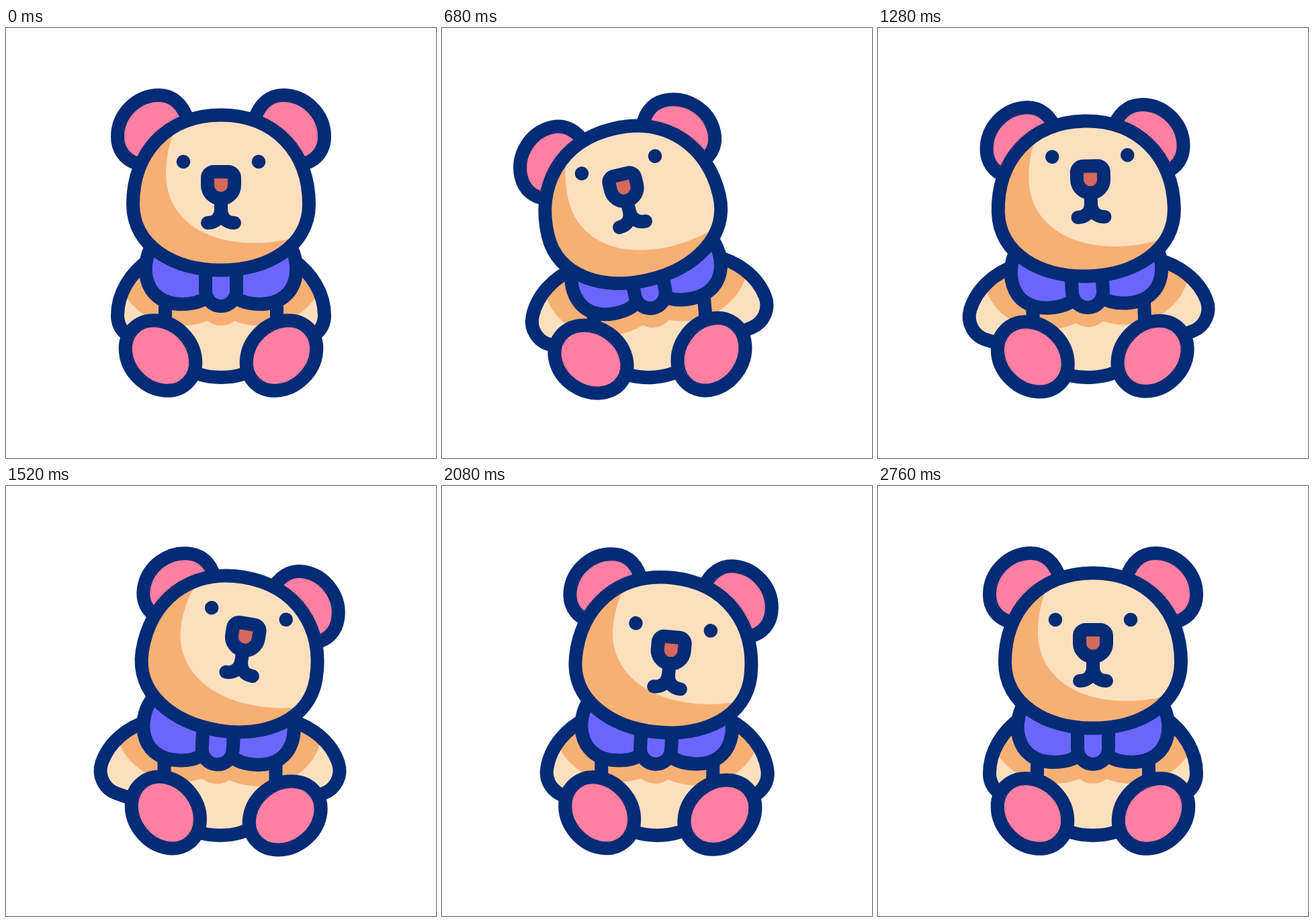
These frames come from a looping animation (640 by 640 pixels, 3 s). An HTML page with a canvas:

```html
<!DOCTYPE html>
<html lang="en">
<head>
<meta charset="utf-8">
<title>Teddy bear</title>
<style>
  html, body { margin: 0; width: 100%; height: 100%; overflow: hidden; background: #fff; }
  canvas { display: block; width: 640px; height: 640px; }
</style>
</head>
<body>
<canvas id="stage" width="640" height="640"></canvas>
<script>
const ctx = document.getElementById('stage').getContext('2d');
const NAVY = '#042b76', PINK = '#ff7fa2', CREAM = '#fce0be',
      ORANGE = '#f7b074', PURPLE = '#6b66fa', BROWN = '#d5695c';

const shape = {
  head: 'M320 129.5C402 129.5 451 187 451 262C451 325 390 360.5 320 360.5S189 325 189 262C189 187 238 129.5 320 129.5Z',
  light: 'M290 80C250 140 238 180 238 218C238 275 285 320 370 320C395 320 420 316 470 302V80Z',
  ear: 'M270 136C263 113 247 100 228 100C194 100 166 128 166 162C166 180 176 195 193 201L260 200Z',
  nose: 'M309 214H331A9 9 0 0 1 340 223V234A20 20 0 0 1 300 234V223A9 9 0 0 1 309 214Z',
  mouth: 'M320 254V270C320 282 312 290 300 290M320 270C320 282 328 290 340 290',
  arm: 'M213 345C185 365 166 395 166 428A36 36 0 0 0 202 464H275V380Z',
  body: 'M237 390V440C237 500 280 520 320 520S403 500 403 440V390Z',
  wing: 'M222 318C198 345 200 411 262 411C275 411 290 408 300 400V318Z',
  knot: 'M297 340V391A23 23 0 0 0 343 391V340Z'
};
for (const name in shape) shape[name] = new Path2D(shape[name]);

const pivot = {
  head: [320, 355], body: [320, 430], collar: [320, 375], arm: [203, 355],
  footL: [230, 487.5], footR: [410, 487.5]
};

// Each part of a pose: shift x, shift y, rotation in degrees.
const rest = {
  head: [0, 0, 0], face: [0, 0, 0], light: [0, 0, 0], earL: [0, 0, 0], earR: [0, 0, 0],
  body: [0, 0, 0], arm: [0, 0, 0], collar: [0, 0, 0], footL: [0, 0, 0], footR: [0, 0, 0]
};
const left = {
  head: [-15, 16.2, -15.1], face: [-5.3, -17.5, 0], light: [-8, -0.5, 0],
  earL: [4.8, 7, 0], earR: [-9.8, 7, 0],
  body: [-12.3, 0, -5.6], arm: [0, 0, 19.2], collar: [-15, 4, -12.4],
  footL: [-9.6, 6.3, -11.5], footR: [-10.2, -2.2, -11.5]
};
const right = {
  head: [-0.2, 1, 13.4], face: [21, -17, 0], light: [4, -5, 0],
  earL: [11.5, 7.5, 0], earR: [-4, 7.5, 0],
  body: [0.5, 0, 1], arm: [0, 0, 19.2], collar: [-2.5, 0, 6],
  footL: [11, -2.9, 10], footR: [8, 4, 10]
};
const nod = { ...rest, head: [0, 9.5, 0], face: [0, 18.5, 0], light: [0, -9.5, 0] };

const keys = [[0, rest], [200, rest], [810, left], [840, left], [1745, right], [1780, right],
              [2330, nod], [2770, rest], [3000, rest]];

function poseAt(time) {
  const i = keys.findIndex(key => key[0] > time);
  const [t0, from] = keys[i - 1], [t1, to] = keys[i];
  const x = (time - t0) / (t1 - t0), ease = x * x * (3 - 2 * x);
  const pose = {};
  for (const part in from)
    pose[part] = from[part].map((v, k) => v + (to[part][k] - v) * ease);
  return pose;
}

function place(pose, part) {
  const [dx, dy, angle] = pose[part], [px, py] = pivot[part] || [0, 0];
  ctx.translate(px + dx, py + dy);
  ctx.rotate(angle * Math.PI / 180);
  ctx.translate(-px, -py);
}

function scoped(draw) {
  ctx.save();
  draw();
  ctx.restore();
}

function mirror() {
  ctx.translate(640, 0);
  ctx.scale(-1, 1);
}

function fill(path, color) {
  ctx.fillStyle = color;
  ctx.fill(path);
}

function outlined(path, color) {
  fill(path, color);
  ctx.stroke(path);
}

function ellipse(x, y, rx, ry, tilt = 0) {
  const path = new Path2D();
  path.ellipse(x, y, rx, ry, tilt, 0, Math.PI * 2);
  return path;
}

// Fills a part and drops the collar's shadow on it.
function shaded(path, pose) {
  fill(path, CREAM);
  scoped(() => {
    ctx.clip(path);
    ctx.resetTransform();
    place(pose, 'collar');
    fill(ellipse(262, 360, 95, 83), ORANGE);
    fill(ellipse(378, 360, 95, 83), ORANGE);
    fill(ellipse(320, 410, 33, 33), ORANGE);
  });
  ctx.stroke(path);
}

function drawBody(pose) {
  place(pose, 'body');
  for (const flip of [false, true]) scoped(() => {
    if (flip) mirror();
    place(pose, 'arm');
    shaded(shape.arm, pose);
  });
  shaded(shape.body, pose);
}

function drawCollar(pose) {
  place(pose, 'collar');
  outlined(shape.wing, PURPLE);
  scoped(() => { mirror(); outlined(shape.wing, PURPLE); });
  outlined(shape.knot, PURPLE);
}

function drawFoot(pose, part, tilt) {
  place(pose, part);
  outlined(ellipse(...pivot[part], 57, 47, tilt), PINK);
}

function drawHead(pose) {
  place(pose, 'head');
  scoped(() => { place(pose, 'earL'); outlined(shape.ear, PINK); });
  scoped(() => { place(pose, 'earR'); mirror(); outlined(shape.ear, PINK); });
  fill(shape.head, ORANGE);
  scoped(() => {
    ctx.clip(shape.head);
    place(pose, 'light');
    fill(shape.light, CREAM);
  });
  ctx.stroke(shape.head);
  place(pose, 'face');
  fill(ellipse(264, 199, 10.3, 10.3), NAVY);
  fill(ellipse(376, 199, 10.3, 10.3), NAVY);
  outlined(shape.nose, BROWN);
  ctx.stroke(shape.mouth);
}

function frame(now) {
  const pose = poseAt(now % 3000);
  ctx.resetTransform();
  ctx.fillStyle = '#fff';
  ctx.fillRect(0, 0, 640, 640);
  ctx.strokeStyle = NAVY;
  ctx.lineWidth = 20;
  ctx.lineCap = ctx.lineJoin = 'round';
  scoped(() => drawBody(pose));
  scoped(() => drawFoot(pose, 'footL', Math.PI / 4));
  scoped(() => drawFoot(pose, 'footR', -Math.PI / 4));
  scoped(() => drawCollar(pose));
  scoped(() => drawHead(pose));
  requestAnimationFrame(frame);
}
requestAnimationFrame(frame);
</script>
</body>
</html>
```
